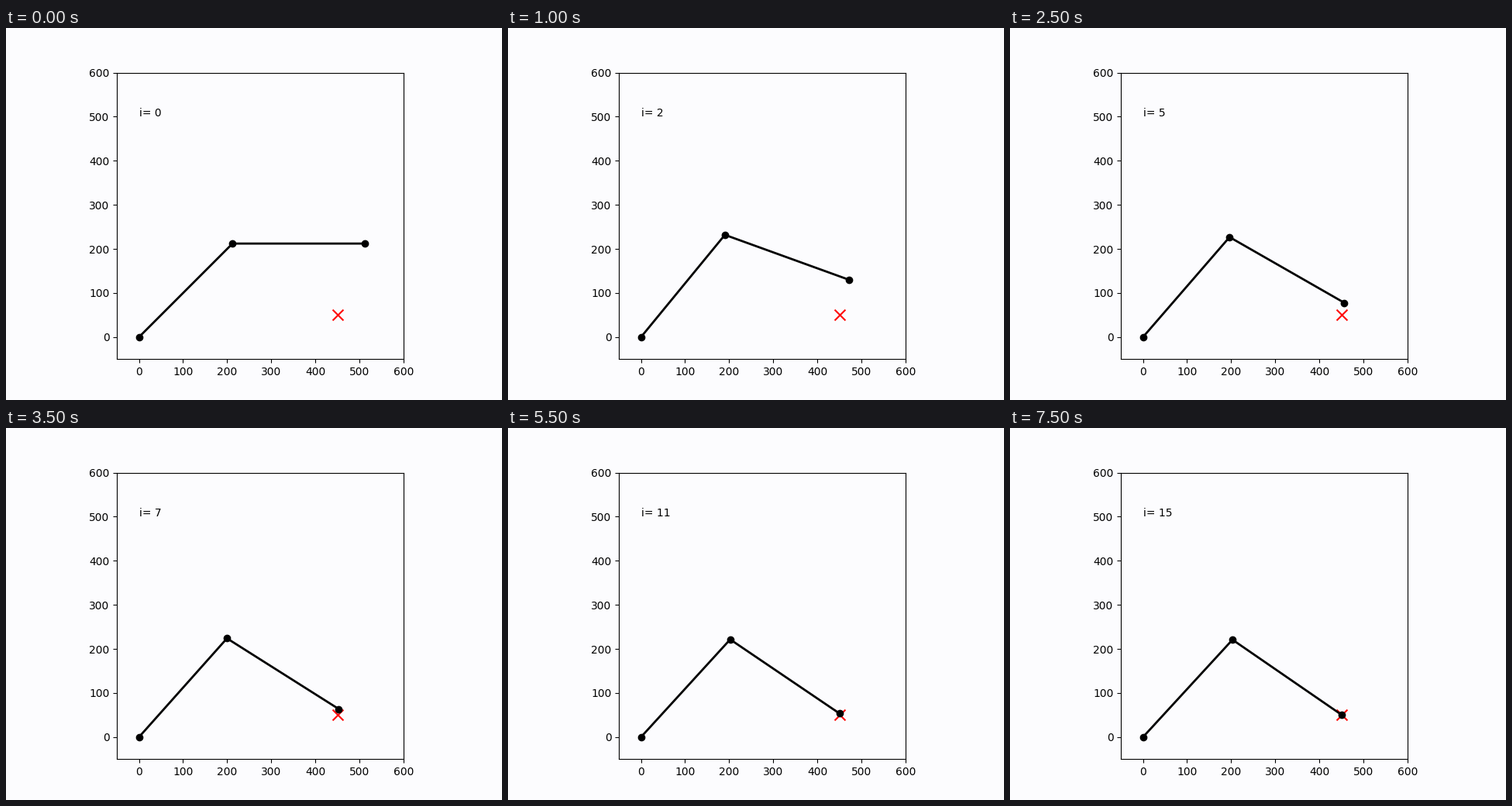
Animation of 640 by 480 pixels, one loop 8000 ms. Source, as a matplotlib script:

```python
import numpy as np
import matplotlib.pyplot as plt
from matplotlib.animation import FuncAnimation

LINK = 300
TARGET = np.array([450, 50])
GAIN = 0.3
STEPS = 16
BG = "#fcfcfe"


def joints(angles):
    """Base, elbow and hand of the arm for absolute link angles."""
    links = LINK * np.column_stack([np.cos(angles), np.sin(angles)])
    return np.vstack([[0, 0], np.cumsum(links, axis=0)])


def solve():
    """Damped Newton inverse kinematics; one pose per step."""
    angles = np.array([np.pi / 4, 0.0])
    poses = []
    for _ in range(STEPS):
        pose = joints(angles)
        poses.append(pose)
        jac = LINK * np.array([-np.sin(angles), np.cos(angles)])
        angles = angles + np.linalg.solve(jac, GAIN * (TARGET - pose[-1]))
    return poses


poses = solve()

fig, ax = plt.subplots(figsize=(6.4, 4.8), dpi=100, facecolor=BG)
ax.set_facecolor(BG)
ax.set_aspect("equal")
ax.set_xlim(-50, 600)
ax.set_ylim(-50, 600)
ticks = range(0, 601, 100)
ax.set_xticks(ticks)
ax.set_yticks(ticks)

ax.scatter(*TARGET, s=100, marker="x", color="red")
arm, = ax.plot([], [], "o-", color="black", lw=2)
label = ax.text(0, 500, "")


def draw(i):
    arm.set_data(*poses[i].T)
    label.set_text(f"i= {i}")
    return arm, label


anim = FuncAnimation(fig, draw, frames=STEPS, interval=500, repeat=True,
                     repeat_delay=0)
plt.show()
```
